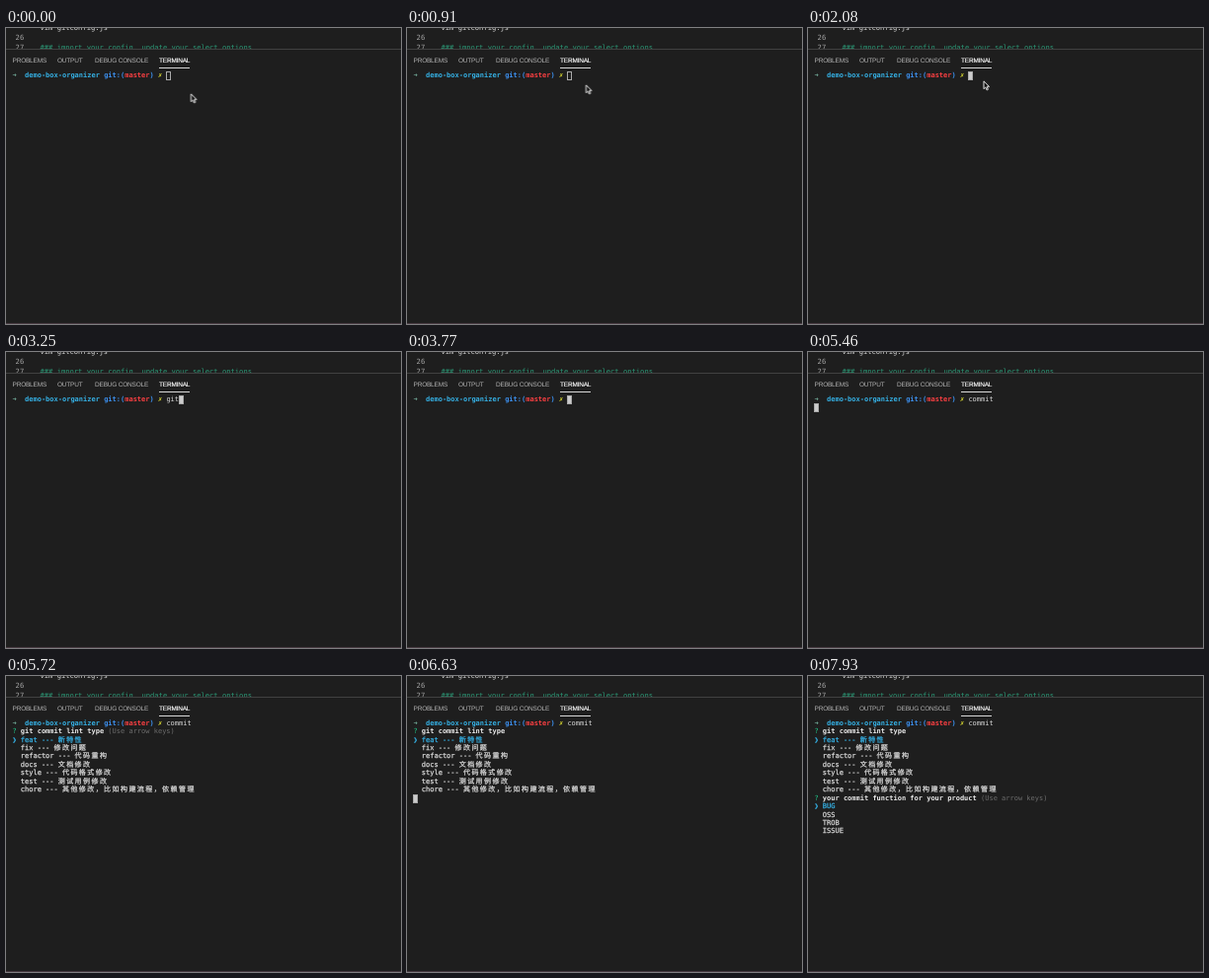
An HTML page that plays this animation: 400x300 px, repeating every 8 s.

```html
<!DOCTYPE html>
<html lang="zh-CN">
<head>
<meta charset="utf-8">
<title>Terminal prompt</title>
<style>
  :root { --c: 4.214px; --row: 8.46px; }
  html, body { margin: 0; width: 100%; height: 100%; overflow: hidden; background: #1e1e1e; }
  #stage {
    position: relative; width: 400px; height: 300px; overflow: hidden;
    background: #1e1e1e; color: #d8d8d8; text-rendering: geometricPrecision;
    font: 7px/var(--row) "DejaVu Sans Mono", "Noto Sans CJK SC", "Noto Sans CJK", monospace;
  }
  #stage * { animation-duration: 8s; animation-delay: -5ms; animation-timing-function: step-end; animation-iteration-count: infinite; }

  #editor { position: absolute; inset: 0 0 auto; height: 21px; overflow: hidden; border-bottom: 1px solid #414141; font-size: 7.13px; line-height: 10px; }
  #editor span { position: absolute; left: 34.5px; white-space: pre; }
  #editor .num { left: 9.6px; color: #a5a5a5; }
  #editor .head { color: #2b9a77; }

  #tabs span { position: absolute; top: 28.7px; line-height: 10px; font-family: "Liberation Sans", sans-serif; font-size: 6.5px; letter-spacing: -.2px; color: #b4b4b4; white-space: pre; }
  #tabs .on { color: #fff; -webkit-text-stroke: .15px; }
  #tabs i { position: absolute; left: 155px; top: 40px; width: 31px; height: 1px; background: #d8d8d8; }

  #term { position: absolute; left: 6.4px; top: 43.6px; }
  .line { height: var(--row); white-space: pre; }
  .item { -webkit-text-stroke: .25px; }
  .zh { letter-spacing: 1.428px; }
  .cyan { color: #35b0e4; }
  .blue { color: #3b8eea; }
  .red { color: #f93f42; }
  .yellow { color: #e5e532; }
  .green { color: #1fc587; }
  .arrow { color: #74ad9a; }
  .dim { color: #6c6c6c; }
  b { color: #e8e8e8; }

  .typed { display: inline-block; width: 0; height: var(--row); overflow: hidden; vertical-align: top; }
  .block { display: inline-block; box-sizing: border-box; width: 5px; height: 9px; border: 1px solid #aaa; vertical-align: top; }
  #git { animation-name: git; }
  #commit { animation-name: commit; }
  #caret { animation-name: caret; }
  #wait { position: absolute; left: 0; background: #ccc; animation-name: wait; }
  #first { animation-name: first; }
  #hint { animation-name: hint; }
  #second { animation-name: second; }
  #mouse { position: absolute; left: 0; top: 0; overflow: visible; animation-name: mouse; }

  @keyframes git {
    0% { width: 0; }
    32.5% { width: var(--c); }
    35.75% { width: calc(2 * var(--c)); }
    37.375% { width: calc(3 * var(--c)); }
    43.875% { width: calc(2 * var(--c)); }
    45.5% { width: var(--c); }
    47.125%, 100% { width: 0; }
  }
  @keyframes commit {
    0% { width: 0; }
    52% { width: var(--c); }
    53.625% { width: calc(2 * var(--c)); }
    55.25% { width: calc(3 * var(--c)); }
    58.5% { width: calc(4 * var(--c)); }
    61.75% { width: calc(5 * var(--c)); }
    63.375%, 100% { width: calc(6 * var(--c)); }
  }
  @keyframes caret {
    0% { background: transparent; opacity: 1; }
    26% { background: #ccc; opacity: 1; }
    65%, 100% { background: #ccc; opacity: 0; }
  }
  @keyframes wait {
    0% { top: var(--row); opacity: 0; }
    65% { top: var(--row); opacity: 1; }
    69.875% { top: var(--row); opacity: 0; }
    81.25% { top: calc(9 * var(--row)); opacity: 1; }
    84.5%, 100% { top: calc(9 * var(--row)); opacity: 0; }
  }
  @keyframes first { 0% { opacity: 0; } 69.875%, 100% { opacity: 1; } }
  @keyframes hint { 0% { opacity: 1; } 81.25%, 100% { opacity: 0; } }
  @keyframes second { 0% { opacity: 0; } 84.5%, 100% { opacity: 1; } }
  @keyframes mouse {
    0% { transform: translate(187.4px, 66.8px); opacity: 1; animation-timing-function: steps(7); }
    11.375% { transform: translate(181.4px, 57.8px); opacity: 1; animation-timing-function: steps(5); }
    19.5% { transform: translate(178px, 53.8px); opacity: 1; }
    32.5%, 100% { transform: translate(178px, 53.8px); opacity: 0; }
  }

  #status { position: absolute; left: 0; bottom: 0; width: 400px; height: 1px; background: #45383f; }
</style>
</head>
<body>
<div id="stage">
  <div id="editor">
    <span style="top:-5.4px">vim gitconfig.js</span>
    <span class="num" style="top:4.6px">26</span>
    <span class="num" style="top:14.6px">27</span>
    <span class="head" style="top:14.6px">### import your config, update your select options</span>
  </div>

  <div id="tabs">
    <span style="left:6.5px">PROBLEMS</span>
    <span style="left:52px">OUTPUT</span>
    <span style="left:90px">DEBUG CONSOLE</span>
    <span class="on" style="left:155px">TERMINAL</span>
    <i></i>
  </div>

  <div id="term">
    <div class="line"><b class="arrow">➜</b>  <b class="cyan">demo-box-organizer</b> <b class="blue">git:(</b><b class="red">master</b><b class="blue">)</b> <b class="yellow">✗</b> <span class="typed" id="git">git</span><span class="typed" id="commit">commit</span><span class="block" id="caret"></span></div>
    <div id="first">
      <div class="line"><span class="green">?</span> <b>git commit lint type</b> <span class="dim" id="hint">(Use arrow keys)</span></div>
      <div class="line item cyan">❯ feat --- <span class="zh">新特性</span></div>
      <div class="line item">  fix --- <span class="zh">修改问题</span></div>
      <div class="line item">  refactor --- <span class="zh">代码重构</span></div>
      <div class="line item">  docs --- <span class="zh">文档修改</span></div>
      <div class="line item">  style --- <span class="zh">代码格式修改</span></div>
      <div class="line item">  test --- <span class="zh">测试用例修改</span></div>
      <div class="line item">  chore --- <span class="zh">其他修改，比如构建流程，依赖管理</span></div>
    </div>
    <div id="second">
      <div class="line"><span class="green">?</span> <b>your commit function for your product</b> <span class="dim">(Use arrow keys)</span></div>
      <div class="line item cyan">❯ BUG</div>
      <div class="line item">  OSS</div>
      <div class="line item">  TROB</div>
      <div class="line item">  ISSUE</div>
    </div>
    <span class="block" id="wait"></span>
  </div>

  <svg id="mouse" width="7" height="10">
    <path d="M0 0V7.9L1.8 6.2 3 9 4.4 8.4 3.2 5.7H5.6Z" fill="#111" stroke="#fff" stroke-width=".9" stroke-linejoin="round"/>
  </svg>
  <div id="status"></div>
</div>
</body>
</html>
```
